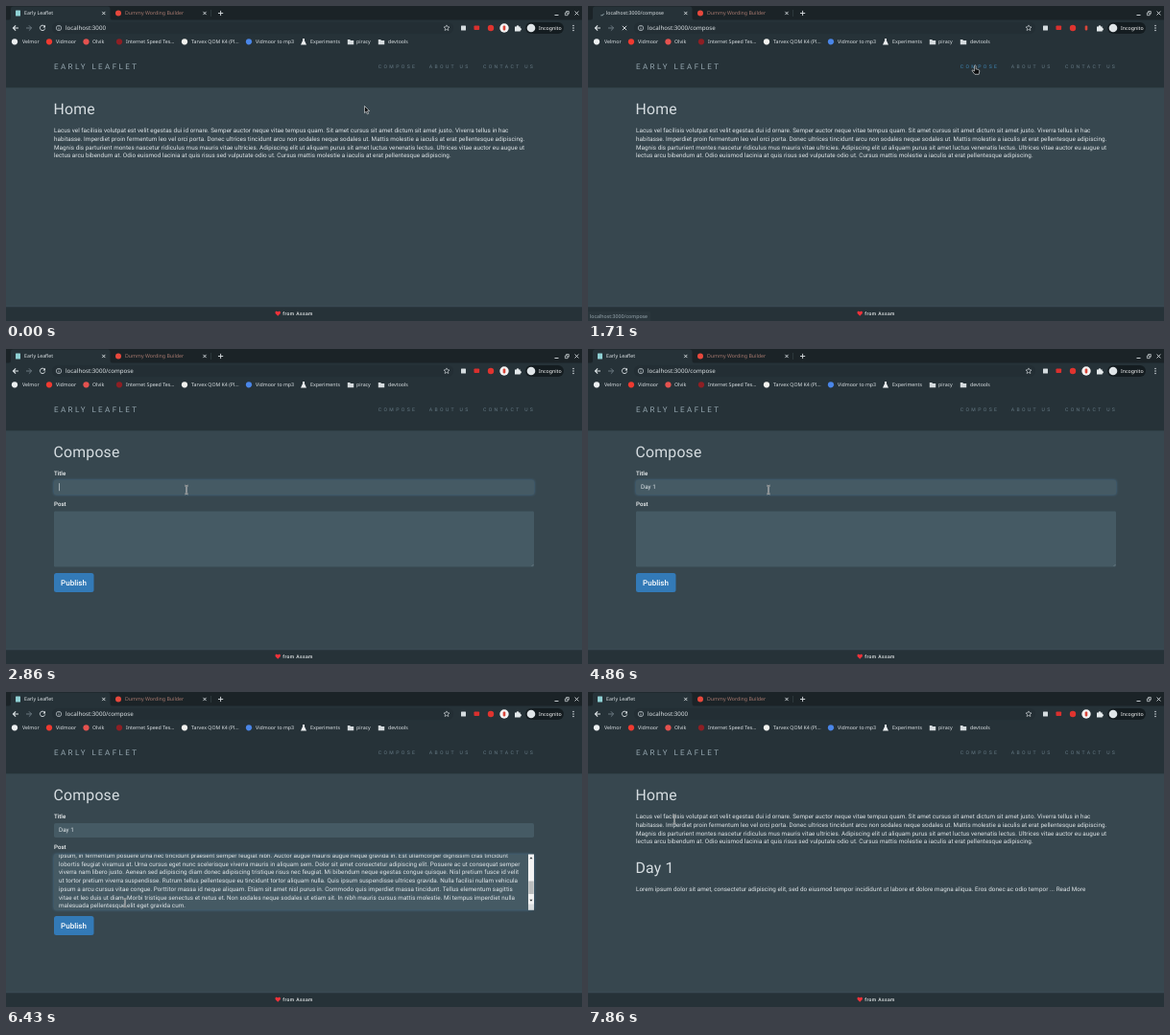
Animation, 600 px wide and 329 px high, one loop 8000 ms. Source, as an HTML page:

```html
<!DOCTYPE html>
<html lang="en">
<head>
<meta charset="utf-8">
<title>Journal demo</title>
<style>
  html, body { margin: 0; width: 100%; height: 100%; overflow: hidden; background: #37474f; }
  svg { display: block; width: 100vw; height: 100vh; }
  text { white-space: pre; text-rendering: geometricPrecision; }
  .ui { font: 5.25px "Noto Sans", sans-serif; fill: #dde3e6; }
  .url { font-size: 6.2px; }
  .page { font-family: Roboto, Arial, sans-serif; fill: #dfe5e8; }
  .body { font-size: 6.3px; letter-spacing: .05px; }
  .head { font-size: 15.8px; letter-spacing: .22px; fill: #d6dde1; }
  .label { font-size: 6.15px; font-weight: 500; fill: #f2f5f6; }
  .button { font-size: 8px; font-weight: 500; fill: #fff; }
  .brand { font-size: 8px; letter-spacing: 2.42px; fill: #94a5ae; }
  .nav { font-size: 5.1px; letter-spacing: 2.4px; fill: #647883; }
  .foot { font-size: 5px; font-weight: 500; letter-spacing: .4px; fill: #eef1f2; }
  .line { fill: none; stroke: #dde3e6; stroke-width: .9; }
</style>
</head>
<body>
<svg id="stage" viewBox="0 0 600 329" preserveAspectRatio="none"></svg>
<script>
const LOOP = 8000;
const SITE = 'Early Leaflet';
const HOST = 'localhost:3000';

const intro = [
  'Lacus vel facilisis volutpat est velit egestas dui id ornare. Semper auctor neque vitae tempus quam. Sit amet cursus sit amet dictum sit amet justo. Viverra tellus in hac',
  'habitasse. Imperdiet proin fermentum leo vel orci porta. Donec ultrices tincidunt arcu non sodales neque sodales ut. Mattis molestie a iaculis at erat pellentesque adipiscing.',
  'Magnis dis parturient montes nascetur ridiculus mus mauris vitae ultricies. Adipiscing elit ut aliquam purus sit amet luctus venenatis lectus. Ultrices vitae auctor eu augue ut',
  'lectus arcu bibendum at. Odio euismod lacinia at quis risus sed vulputate odio ut. Cursus mattis molestie a iaculis at erat pellentesque adipiscing.'
];
const excerpt = 'Lorem ipsum dolor sit amet, consectetur adipiscing elit, sed do eiusmod tempor incididunt ut labore et dolore magna aliqua. Eros donec ac odio tempor ... Read More';
const post = [
  'ipsum, in fermentum posuere urna nec tincidunt praesent semper feugiat nibh. Auctor augue mauris augue neque gravida in. Est ullamcorper dignissim cras tincidunt',
  'lobortis feugiat vivamus at. Urna cursus eget nunc scelerisque viverra mauris in aliquam sem. Dolor sit amet consectetur adipiscing elit. Posuere ac ut consequat semper',
  'viverra nam libero justo. Aenean sed adipiscing diam donec adipiscing tristique risus nec feugiat. Mi bibendum neque egestas congue quisque. Nisl pretium fusce id velit',
  'ut tortor pretium viverra suspendisse. Rutrum tellus pellentesque eu tincidunt tortor aliquam nulla. Quis ipsum suspendisse ultrices gravida. Nulla facilisi nullam vehicula',
  'ipsum a arcu cursus vitae congue. Porttitor massa id neque aliquam. Etiam sit amet nisl purus in. Commodo quis imperdiet massa tincidunt. Tellus elementum sagittis',
  'vitae et leo duis ut diam. Morbi tristique senectus et netus et. Non sodales neque sodales ut etiam sit. In nibh mauris cursus mattis molestie. Mi tempus imperdiet nulla',
  'malesuada pellentesque elit eget gravida cum.'
];

// icon centre, icon colour, label start, label
const bookmarks = [
  [9, '#eceff1', 17, 'Velmor'],
  [45, '#f03a30', 52, 'Vidmoor'],
  [83.5, '#e5524f', 90, 'Olvik'],
  [118, '#8e1f24', 125, 'Internet Speed Tes...'],
  [186, '#f2f2ee', 193, 'Tarvex QOM K4 (Pl...'],
  [253, '#4a86e8', 260, 'Vidmoor to mp3'],
  [310, 'flask', 317, 'Experiments'],
  [359, 'folder', 365, 'piracy'],
  [391, 'folder', 398, 'devtools']
];

// Step tables: [start ms, value...]
const cursorSteps = [
  [0, 'arrow', 373.5, 104.5], [430, 'arrow', 375, 102], [570, 'arrow', 380, 95],
  [710, 'arrow', 387, 85], [860, 'arrow', 394, 76], [1000, 'arrow', 399, 70],
  [1140, 'hand', 401, 65], [1290, 'hand', 402.5, 63], [1430, 'hand', 403.3, 62],
  [2000, 'arrow', 392, 72], [2140, 'arrow', 350, 92], [2290, 'arrow', 275, 122],
  [2430, 'beam', 212, 143], [2570, 'beam', 188, 147],
  [5710, 'beam', 186, 152], [5860, 'beam', 176, 170], [6000, 'beam', 158, 190],
  [6140, 'beam', 140, 207], [6290, 'beam', 128, 216], [6430, 'beam', 124, 220],
  [6570, 'hand', 88, 245.5], [6710, 'hand', 82, 250], [6860, 'hand', 80.3, 252],
  [7860, 'beam', 90, 133]
];
const pageSteps = [[0, 'home'], [1860, 'compose'], [7710, 'posted']];
const pathSteps = [[0, ''], [1570, '/compose'], [7000, '']];
const tabSteps = [[0, SITE], [1570, HOST + '/compose'], [1860, SITE]];
const loadSteps = [[0, 0], [1570, 1], [1860, 0], [7000, 1], [7710, 0]];
const linkSteps = [[0, 0], [1140, 1], [2000, 0]];
const typeSteps = [[0, ''], [3290, 'D'], [3570, 'Da'], [3710, 'Day'], [3860, 'Day '], [4290, 'Day 1']];
const titleGlow = [[0, 0], [2710, .5], [2860, 1], [5000, .5], [5140, 0]];
const postGlow = [[0, 0], [5000, .5], [5140, 1], [6860, .5], [7000, 0]];
const caretSteps = [[0, ''], [2710, 'title'], [4860, ''], [5140, 'post'], [5570, '']];
const pastedSteps = [[0, 0], [5570, 1]];
const buttonSteps = [[0, 'idle'], [6570, 'hover'], [6860, 'focus']];

const at = (steps, t) => steps.findLast(s => s[0] <= t);
const val = (steps, t) => at(steps, t)[1];

const text = (x, y, cls, str, extra = '') => `<text x="${x}" y="${y}" class="${cls}" ${extra}>${str}</text>`;
const rect = (x, y, w, h, fill, r = 0, extra = '') =>
  `<rect x="${x}" y="${y}" width="${w}" height="${h}" rx="${r}" fill="${fill}" ${extra}/>`;
const dot = (x, y, r, fill, extra = '') => `<circle cx="${x}" cy="${y}" r="${r}" fill="${fill}" ${extra}/>`;
const line = (d, extra = '') => `<path d="${d}" class="line" ${extra}/>`;
const cross = (x, y, r) => line(`M${x - r} ${y - r}l${2 * r} ${2 * r}m0 ${-2 * r}l${-2 * r} ${2 * r}`);
const para = (lines, x, y) => lines.map((s, i) => text(x, y + i * 8.78, 'page body', s)).join('');

function bookmark([x, icon, tx, label]) {
  const shapes = {
    flask: `<path d="M${x - 1} 34h2v2.2l2 4.2h-6l2-4.2z" fill="#eceff1"/>`,
    folder: `<path d="M${x - 3.2} 35h2.4l.8 .9h3.2v4.4h-6.4z" fill="#d5dbde"/>`
  };
  return (shapes[icon] || dot(x, 37.3, 3.1, icon)) + text(tx, 39.3, 'ui', label);
}

const chrome = () => `
  ${rect(0, 0, 600, 15, '#1b2327')}
  <path d="M3 15q2-.5 2-3V3q0-2.5 2.5-2.5h98.5q2.5 0 2.5 2.5v9q0 2.5 2 3z" fill="#263238"/>
  ${rect(0, 14.5, 600, 31, '#263238')}
  ${rect(48, 16.8, 418, 12.4, '#232e34', 6.2)}
  <g id="favicon">${rect(10, 4.5, 5, 6, '#8ed0d3', .5)}</g>
  <path id="spinner" d="M14 4.7a2.6 2.6 0 0 1 2.6 2.6" class="line" style="stroke:#8fa0a8"/>
  ${text(19, 9.4, 'ui', '', 'id="tab"')}
  ${cross(101.8, 7.5, 1.6)}
  ${dot(117, 7.5, 3, '#e8483c')}
  ${text(124, 9.4, 'ui', 'Dummy Wording Builder', 'style="fill:#a8796f"')}
  ${cross(207, 7.5, 1.6)}
  ${line('M213.5 4v7', 'style="stroke:#3a464c;stroke-width:.6"')}
  ${line('M221 7.5h5.2m-2.6-2.6v5.2')}
  ${line('M571.5 9.5h4')}
  ${line('M582.4 7h2.7v2.7h-2.7zM583.6 6.8v-1.3h2.7v2.7h-1', 'style="stroke-width:.7"')}
  ${cross(594.5, 7.5, 1.9)}
  ${line('M13 23h-5.5m2.6-2.7l-2.7 2.7l2.7 2.7', 'style="stroke-width:1.1"')}
  ${line('M21 23h5.5m-2.6-2.7l2.7 2.7l-2.7 2.7', 'style="stroke:#73818a"')}
  <g id="reload">${line('M40.2 21.2a2.7 2.7 0 1 0 .5 2.3')}<path d="M41 19.8v2.6h-2.6z" fill="#dde3e6"/></g>
  <g id="stop">${cross(38, 23, 2.2)}</g>
  ${dot(55, 23, 2.7, 'none', 'stroke="#c3ccd1" stroke-width=".7"')}
  ${line('M55 22.7v1.9M55 21.2v.7', 'style="stroke-width:.7"')}
  ${text(62, 25.2, 'ui url', '', 'id="url"')}
  <path d="M459 19.9l.9 1.9 2.1.2-1.6 1.4.5 2.1-1.9-1.1-1.9 1.1.5-2.1-1.6-1.4 2.1-.2z" class="line" style="stroke-width:.6"/>
  ${rect(474, 20.5, 5, 5, '#d5dcdf', .5)}
  ${rect(487.5, 20.5, 5.6, 4.6, '#d9302e', .8)}
  ${dot(505, 23, 3.2, '#e0342f')}
  <g id="badge">${dot(519, 23, 4.7, '#f3f3f3')}</g>
  ${rect(517.7, 20.6, 2.6, 4.8, '#d9453a', .8)}
  <path d="M530 21.5h1.7a1.3 1.3 0 1 1 2.6 0h1.4v1.5a1.2 1.2 0 1 1 0 2.4v1h-5.7z" fill="#e4e9eb"/>
  ${rect(541, 17, 40, 12, '#141c20', 6)}
  ${dot(547, 23, 4.3, '#dfe4e7')}
  ${text(555, 25, 'ui', 'Incognito', 'style="fill:#fff"')}
  ${[20.5, 23, 25.5].map(y => dot(591, y, .75, '#dde3e6')).join('')}
  ${bookmarks.map(bookmark).join('')}`;

const site = () => `
  ${rect(0, 45, 600, 40.3, '#263238')}
  ${text(50, 66.2, 'page brand', SITE.toUpperCase())}
  ${text(387.7, 65.2, 'page nav', 'COMPOSE', 'id="link"')}
  ${text(440.7, 65.2, 'page nav', 'ABOUT US')}
  ${text(497, 65.2, 'page nav', 'CONTACT US')}
  ${rect(0, 314, 600, 15, '#263238')}
  ${rect(0, 313.7, 600, .6, '#4b5d66', 0, 'opacity=".6"')}
  <path d="M283.2 323.8l-2.5-2.6q-.9-1.7.6-2.4 1.2-.4 1.9.8.7-1.2 1.9-.8 1.5.7.6 2.4z" fill="#f0323a"/>
  ${text(288.3, 322.9, 'page foot', 'from Assam')}`;

const home = () => `
  <g id="home">${text(49.5, 113.2, 'page head', 'Home')}${para(intro, 50, 132.1)}
    <g id="entry">${text(49.5, 189, 'page head', 'Day 1')}${para([excerpt], 50, 207.8)}</g>
  </g>`;

const glow = (id, y, h) => rect(50, y, 500, h, '#5aa0d4', 2, `id="${id}" filter="url(#soft)"`);
const compose = () => `
  <g id="compose">
    ${text(49.5, 113.2, 'page head', 'Compose')}
    ${text(50, 131.7, 'page label', 'Title')}
    ${glow('titleGlow', 137, 15)}${rect(50, 137, 500, 15, '#455a64', 1.8)}
    ${text(55, 146.3, 'page body', '', 'id="title"')}
    ${text(50, 164.3, 'page label', 'Post')}
    ${glow('postGlow', 169.5, 58)}${rect(50, 169.5, 500, 58, '#455a64', 1.2)}
    ${line('M547.5 227l2-2', 'style="stroke:#8a999f;stroke-width:.5"')}
    <g id="pasted">
      <g clip-path="url(#area)">${para(post, 55, 172.8)}</g>
      ${rect(544, 169.5, 6, 58, '#f3f3f3')}
      ${rect(544.3, 197.5, 5.4, 13.5, '#b9bcbd')}
      <path d="M545.4 174.2h3.2l-1.6-2zM545.4 216.8h3.2l-1.6 2z" fill="#33393c"/>
      ${rect(544, 221.5, 6, 6, '#d9dddf')}
    </g>
    ${rect(0, 0, .6, 8, '#e4eaed', 0, 'id="caret"')}
    ${rect(50, 234, 41.5, 20, '#337ab7', 2.5, 'id="button"')}
    <g id="ring" stroke-width=".8">
      ${rect(50, 234.2, 41.2, 19.5, 'none', 2.5, 'stroke="#eef2f4"')}
      ${rect(50.8, 235, 39.6, 17.9, 'none', 2, 'stroke="#14202a"')}
    </g>
    ${text(57.1, 246.9, 'page button', 'Publish')}
  </g>`;

const beamPath = 'M-1.7-4.6q1.5 0 1.7 1v7.2q-.2 1-1.7 1M1.7-4.6q-1.5 0-1.7 1M0 3.6q.2 1 1.7 1';
const pointers = () => `
  <path id="arrow" d="M0 0v7.2l1.7-1.5 1.2 2.7 1.2-.5-1.2-2.7h2.2z" fill="#0b0d0e" stroke="#f2f4f5" stroke-width=".6"/>
  <path id="hand" d="M-.7 .5q.8-1 1.5 0v3.3l2.8.7q1 .4.9 1.5l-.6 3.3h-4.3l-2.7-3.4q-.4-1.2.8-.9l1.6 1z" fill="#0b0d0e" stroke="#f2f4f5" stroke-width=".6"/>
  <g id="beam" fill="none">
    <path d="${beamPath}" stroke="#eef1f2" stroke-width="1.5"/>
    <path d="${beamPath}" stroke="#101618" stroke-width=".6"/>
  </g>`;

const stage = document.getElementById('stage');
stage.innerHTML = `
  <defs>
    <filter id="soft" x="-5%" y="-50%" width="110%" height="200%"><feGaussianBlur stdDeviation="1.5"/></filter>
    <clipPath id="area"><rect x="50" y="169.5" width="494" height="58"/></clipPath>
  </defs>
  ${rect(0, 0, 600, 329, '#37474f')}${chrome()}${site()}${home()}${compose()}
  <g id="status">${rect(-2, 319, 67, 12, '#2a363c', 1.5)}
    ${text(2, 326, 'ui', HOST + '/compose', 'style="fill:#9aa9b1"')}</g>
  ${pointers()}`;

const el = {};
stage.querySelectorAll('[id]').forEach(n => el[n.id] = n);
const show = (id, on) => el[id].style.display = on ? '' : 'none';
const write = (id, str) => { if (el[id].textContent !== str) el[id].textContent = str; };

function render(t) {
  const page = val(pageSteps, t);
  const loading = val(loadSteps, t);
  const linked = val(linkSteps, t);
  const caret = val(caretSteps, t);
  const button = val(buttonSteps, t);

  show('home', page !== 'compose');
  show('entry', page === 'posted');
  show('compose', page === 'compose');

  write('tab', val(tabSteps, t));
  write('url', HOST + val(pathSteps, t));
  write('title', val(typeSteps, t));
  show('favicon', !loading);
  show('reload', !loading);
  show('badge', !loading);
  show('stop', loading);
  show('spinner', loading);
  el.spinner.setAttribute('transform', `rotate(${Math.floor(t * 7 / 1000) * 75} 14 7.3)`);

  show('status', linked);
  el.link.style.fill = linked ? '#3f86b4' : '';
  el.titleGlow.setAttribute('opacity', val(titleGlow, t) * .5);
  el.postGlow.setAttribute('opacity', val(postGlow, t) * .5);
  show('pasted', val(pastedSteps, t));
  show('ring', button === 'focus');
  el.button.setAttribute('fill', button === 'idle' ? '#337ab7' : '#286090');

  show('caret', caret);
  if (caret && page === 'compose') {
    const typed = caret === 'title' ? el.title.getComputedTextLength() : 0;
    el.caret.setAttribute('x', 55 + typed);
    el.caret.setAttribute('y', caret === 'title' ? 140.2 : 172.5);
  }

  const [, kind, x, y] = at(cursorSteps, t);
  for (const id of ['arrow', 'hand', 'beam']) show(id, id === kind);
  el[kind].setAttribute('transform', `translate(${x} ${y})`);
}

const start = performance.now();
function tick() {
  render((performance.now() - start) % LOOP);
  requestAnimationFrame(tick);
}
tick();
</script>
</body>
</html>
```
